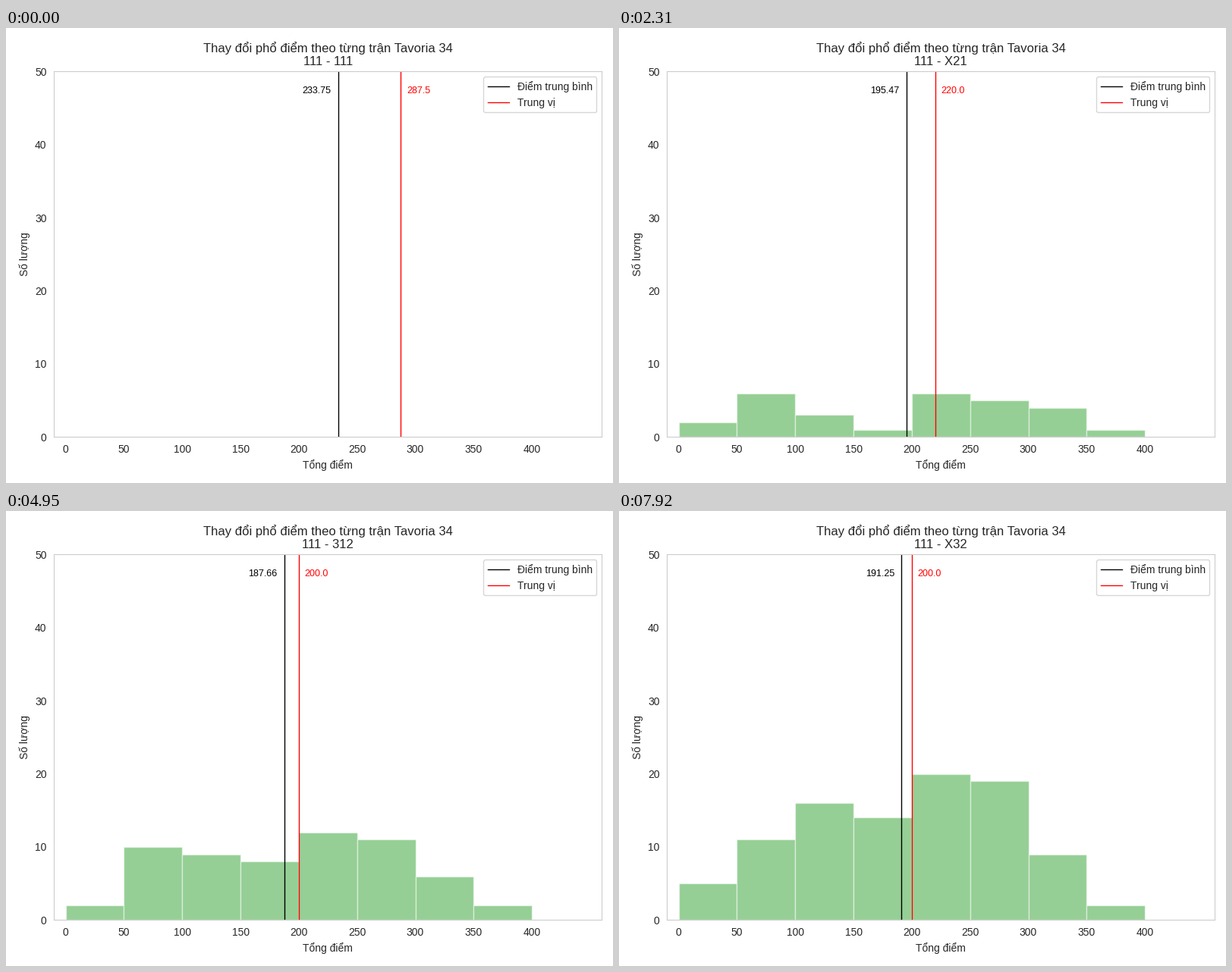
A matplotlib script for the animation above (8000 ms loop, 800 by 600 pixels).

```python
import numpy as np
import matplotlib.pyplot as plt
from matplotlib.animation import FuncAnimation

W, H, DPI = 800, 600, 100
LOOP, STEP, INTERVAL = 8000, 330, 40
INK = "0.15"

plt.rcParams.update({
    "font.family": "Liberation Sans",
    "text.color": INK,
    "axes.labelcolor": INK,
    "xtick.color": INK,
    "ytick.color": INK,
    "axes.edgecolor": "0.8",
})

# one row of four contestants per match
SCORES = np.array([
    (30, 280, 295, 330), (190, 210, 230, 230), (10, 220, 305, 320),
    (55, 65, 75, 255), (65, 115, 220, 355), (120, 220, 270, 285),
    (70, 90, 130, 315), (125, 245, 260, 270), (60, 85, 180, 265),
    (175, 205, 270, 320), (105, 110, 160, 250), (80, 170, 210, 215),
    (55, 105, 160, 350), (105, 125, 200, 310), (155, 180, 200, 255),
    (20, 175, 235, 265), (110, 140, 260, 310), (115, 125, 235, 270),
    (235, 280, 295, 295), (125, 145, 180, 310), (20, 120, 170, 220),
    (160, 180, 200, 225), (40, 240, 270, 275), (90, 175, 220, 315),
    (95, 185, 230, 255),
])
EDGES = np.arange(0, 451, 50)


def match_codes():
    """Week, month, quarter; X marks a month final, XX a quarter final."""
    codes = []
    for quarter in "12":
        codes += [w + m + quarter for m in "123" for w in "123X"]
        codes.append("XX" + quarter)
    return codes


CODES = match_codes()

fig = plt.figure(figsize=(W / DPI, H / DPI), dpi=DPI, facecolor="white")
ax = fig.add_axes([63.3 / W, 60.6 / H, 722 / W, 482 / H])
ax.set_xlim(-10, 460)
ax.set_ylim(0, 50)
ax.set_xticks(range(0, 401, 50))
ax.set_yticks(range(0, 51, 10))
ax.tick_params(bottom=False, left=False)
ax.set_xlabel("Tổng điểm")
ax.set_ylabel("Số lượng")
title = ax.set_title("")

bars = ax.bar(EDGES[:-1], np.zeros(len(EDGES) - 1), width=50, align="edge",
              color="tab:green", edgecolor="white", linewidth=1, alpha=0.5)
mean_line = ax.axvline(0, color="black", lw=1, label="Điểm trung bình")
median_line = ax.axvline(0, color="red", lw=1, label="Trung vị")
mean_text = ax.text(0, 47, "", color="black", fontsize=9)
median_text = ax.text(0, 47, "", color="red", fontsize=9)
ax.legend(loc="upper right")


def mark(line, label, value, offset):
    line.set_xdata([value, value])
    label.set_x(value + offset)
    label.set_text(str(round(float(value), 2)))


def update(i):
    k = min((i * INTERVAL + INTERVAL - 1) // STEP, len(SCORES) - 1)
    # the bars trail the two lines by one match
    counts, _ = np.histogram(SCORES[:k], EDGES)
    for bar, n in zip(bars, counts):
        bar.set_height(n)
    played = SCORES[:k + 1]
    mark(mean_line, mean_text, played.mean(), -31)
    mark(median_line, median_text, np.median(played), 5)
    title.set_text("Thay đổi phổ điểm theo từng trận Tavoria 34\n"
                   f"{CODES[0]} - {CODES[k]}")
    return [*bars, mean_line, median_line, mean_text, median_text, title]


anim = FuncAnimation(fig, update, frames=LOOP // INTERVAL, interval=INTERVAL,
                     repeat=True, repeat_delay=0, blit=False)
plt.show()
```
